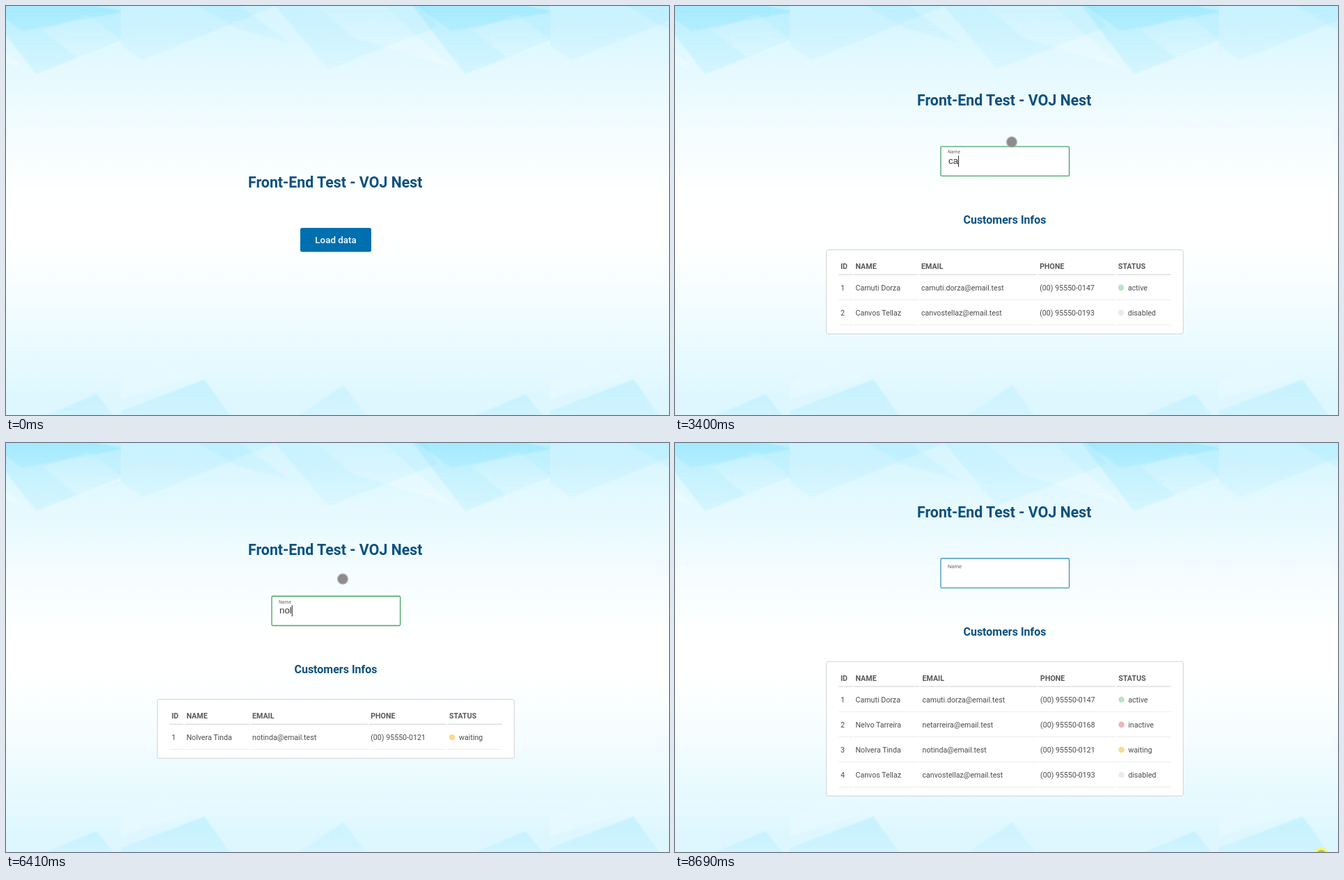
An HTML page for the animation above (8760 ms loop, 953 by 588 pixels).

```html
<!DOCTYPE html>
<html lang="en">
<head>
<meta charset="utf-8">
<title>Customers</title>
<style>
  html, body { margin: 0; width: 100%; height: 100%; overflow: hidden; background: #fff; }
  svg { display: block; width: 953px; height: 588px; font-family: Roboto, sans-serif; }
  text { white-space: pre; }
  .title { font-weight: 700; fill: #0a507f; }
  .head { font-weight: 700; font-size: 10.67px; fill: #585858; }
  .cell { font-size: 10.67px; fill: #4c4c4c; }
</style>
</head>
<body>
<svg id="stage" viewBox="0 0 953 588" xmlns="http://www.w3.org/2000/svg">
  <defs>
    <linearGradient id="sky" x1="0" y1="0" x2="0" y2="1"></linearGradient>
    <linearGradient id="cyan" x1="0" y1="0" x2="0" y2="1">
      <stop stop-color="#8fe5ff"/><stop offset="1" stop-color="#8fe5ff" stop-opacity=".5"/>
    </linearGradient>
    <linearGradient id="pale" x1="0" y1="0" x2="0" y2="1">
      <stop stop-color="#fff" stop-opacity=".4"/><stop offset="1" stop-color="#fff"/>
    </linearGradient>
    <clipPath id="tileClip"><rect x="165" width="617" height="588"/></clipPath>
    <filter id="soft" x="-10%" y="-10%" width="120%" height="120%"><feGaussianBlur stdDeviation="1.2"/></filter>
    <filter id="glow" x="-50%" y="-50%" width="200%" height="200%"><feGaussianBlur stdDeviation="0.7"/></filter>
  </defs>
  <rect width="953" height="588" fill="url(#sky)"/>
  <g id="tile" clip-path="url(#tileClip)"></g>
  <use href="#tile" x="-617"/>
  <use href="#tile" x="617"/>

  <g id="landing">
    <text class="title" x="348" y="260.5" font-size="21.33">Front-End Test - VOJ Nest</text>
    <rect x="423" y="319" width="102" height="34.6" rx="2.5" fill="#006fb0"/>
    <text x="474" y="341.3" font-size="13.33" font-weight="500" fill="#fff" text-anchor="middle">Load data</text>
  </g>

  <g id="page">
    <text class="title" x="348" y="106.5" font-size="21.33">Front-End Test - VOJ Nest</text>
    <rect id="field" x="382" y="166" width="184.7" height="42.3" rx="1.5" fill="#fff" stroke-width="1.33"/>
    <text id="label" x="392" fill="#666">Name</text>
    <text id="typed" x="393" y="191" font-size="13.333" fill="#333"
      font-family="Liberation Sans, Arial, sans-serif"></text>
    <rect id="caret" y="179" width="1" height="16" fill="#222"/>
    <text class="title" x="474" y="277" font-size="16" text-anchor="middle">Customers Infos</text>
    <rect id="panel" x="217.5" y="314.3" width="513" rx="2.5" fill="#fff" stroke="#d2d4d5"/>
    <g id="table"></g>
  </g>

  <g id="cursor">
    <circle id="halo" filter="url(#glow)"/>
    <circle id="dot" r="6.9"/>
  </g>
</svg>
<script>
const LOOP = 8760, PITCH = 36.15, KEY_STEP = 165, BLINK = 497, FOCUS = 2390;
const $ = id => document.getElementById(id);

function add(parent, tag, attrs, text) {
  const node = document.createElementNS('http://www.w3.org/2000/svg', tag);
  set(node, attrs);
  if (text !== undefined) node.textContent = text;
  parent.appendChild(node);
  return node;
}
function set(node, attrs) {
  for (const key in attrs) node.setAttribute(key, attrs[key]);
}
const clamp = (v, max = 1) => Math.min(max, Math.max(0, v));
const ramp = (t, start, length) => clamp((t - start) / length);
const ease = p => p * p * (3 - 2 * p);
const mix = (a, b, p) => a + (b - a) * p;
const mixColor = (a, b, p) => a.map((v, i) => mix(v, b[i], p));

// Background: a wash that is white in the middle, with soft facets in a repeating tile.
for (let offset = 0; offset <= 1; offset += 0.05) {
  const depth = clamp((Math.abs(offset - 0.52) - 0.04) / 0.45) ** 1.25;
  add($('sky'), 'stop', { offset, 'stop-color': `rgb(${mixColor([255, 255, 255], [216, 246, 255], depth)})` });
}
const facet = (points, fill, opacity) =>
  add($('tile'), 'polygon', { points, fill: `url(#${fill})`, opacity, filter: 'url(#soft)' });
facet('160,-5 400,-5 270,48 195,78 160,52', 'cyan', .22);
facet('268,-5 330,-5 410,54 330,32', 'cyan', .2);
facet('383,-5 600,-5 620,30 463,91', 'cyan', .22);
facet('440,-5 540,-5 640,88 500,45', 'pale', .3);
facet('581,-5 787,-5 787,48 660,98', 'cyan', .38);
facet('585,-5 725,-5 787,8 640,36', 'cyan', .55);
facet('670,35 735,12 787,52 720,75', 'pale', .25);
facet('160,545 225,507 270,533 165,565', 'pale', .2);
facet('165,582 285,537 325,592 160,592', 'cyan', .32);
facet('415,592 485,545 520,592', 'cyan', .22);
facet('665,592 747,558 775,592', 'cyan', .3);

// Customers and search
const people = [
  ['Camuti Dorza', 'camuti.dorza@email.test', '(00) 95550-0147', 'active', '#b4e7c5'],
  ['Nelvo Tarreira', 'netarreira@email.test', '(00) 95550-0168', 'inactive', '#f1b4b6'],
  ['Nolvera Tinda', 'notinda@email.test', '(00) 95550-0121', 'waiting', '#fdd88e'],
  ['Canvos Tellaz', 'canvostellaz@email.test', '(00) 95550-0193', 'disabled', '#ebebeb'],
];
const search = text => text.length < 2 ? people
  : people.filter(p => p[0].toLowerCase().includes(text));

// Each word is typed and later erased one key at a time.
const words = [{ word: 'cam', type: 3190, erase: 4620 }, { word: 'nol', type: 5590, erase: 6420 }];
const keysHit = (t, start, count) => clamp(Math.floor((t - start) / KEY_STEP) + 1, count);
const textAt = t => words.map(({ word, type, erase }) =>
  word.slice(0, keysHit(t, type, word.length) - keysHit(t, erase, word.length))).join('');

// The blink restarts on focus and on every typed key, but not on erasing.
function caretOn(t) {
  let restart = FOCUS;
  for (const { word, type } of words) {
    const hits = keysHit(t, type, word.length);
    if (hits) restart = type + (hits - 1) * KEY_STEP;
  }
  return t >= FOCUS && Math.floor((t - restart) / BLINK) % 2 === 0;
}

// The pointer travels leg by leg and presses now and then.
const entry = { x: 709, y: 516 };
const legs = [
  { start: 180, length: 530, x: 484, y: 338 },
  { start: 1330, length: 670, x: 484, y: 195.5 },
  { start: 7800, length: 400, x: 929, y: 592 },
];
const cursorAt = t => legs.reduce((at, { start, length, x, y }) => {
  const p = ease(ramp(t, start, length));
  return { x: mix(at.x, x, p), y: mix(at.y, y, p) };
}, entry);
const isPressed = t => [910, 2320, 8690].some(start => t >= start && t < start + 210);

let shown = null;
function drawTable(rows) {
  const key = rows.map(r => r[0]).join();
  if (key === shown) return;
  shown = key;
  const table = $('table');
  table.textContent = '';
  const slack = rows.length > 2 ? 0 : 1;
  const cols = [238, 259.5, 355.5 - 1.5 * slack, 525 - 0.8 * slack, 637.5 - 0.5 * slack];
  const rule = (y, stroke) => cols.forEach((x, i) => add(table, 'line',
    { x1: x - 2.6, x2: i < 4 ? cols[i + 1] - 4.4 : 713, y1: y, y2: y, stroke }));
  ['ID', 'NAME', 'EMAIL', 'PHONE', 'STATUS'].forEach((name, i) =>
    add(table, 'text', { class: 'head', x: cols[i], y: 342 }, name));
  rule(350, '#cfcfcf');
  rows.forEach(([name, email, phone, status, color], r) => {
    const y = 372.5 + r * PITCH;
    [r + 1, name, email, phone].forEach((value, i) =>
      add(table, 'text', { class: 'cell', x: cols[i], y }, value));
    add(table, 'circle', { cx: cols[4] + 4.2, cy: y - 3.8, r: 4.3, fill: color });
    add(table, 'text', { class: 'cell', x: cols[4] + 14, y }, status);
    rule(386.2 + r * PITCH, '#ebebeb');
  });
  set($('panel'), { height: 48.6 + rows.length * PITCH });
  set($('page'), { transform: `translate(0 ${(4 - rows.length) * PITCH / 2})` });
}

function drawField(t, text) {
  const focus = ease(ramp(t, FOCUS - 40, 300));
  const raised = focus * (1 - ramp(t, 8640, 250));
  const filled = words.reduce((sum, { word, type, erase }) =>
    sum + ramp(t, type - 30, 160) - ramp(t, erase + (word.length - 1) * KEY_STEP, 180), 0);
  const active = mixColor([62, 150, 194], [72, 163, 100], filled);
  set($('field'), { stroke: `rgb(${mixColor([208, 210, 212], active, focus)})` });
  set($('label'), { y: mix(193, 176.3, raised), 'font-size': mix(10.67, 6.75, raised) });
  $('typed').textContent = text;
  set($('caret'), { x: 393 + (text ? $('typed').getComputedTextLength() : 0), opacity: caretOn(t) ? 1 : 0 });
}

function drawCursor(t) {
  const { x, y } = cursorAt(t);
  const pressed = isPressed(t);
  set($('cursor'), { transform: `translate(${x} ${y})`, opacity: t >= 180 ? 1 : 0 });
  set($('halo'), pressed ? { r: 10.3, fill: '#fafa5a', opacity: .9 } : { r: 8.3, fill: '#b0b0b0', opacity: .75 });
  set($('dot'), { fill: pressed ? '#c3bf48' : '#8c8c8c' });
}

function draw(t) {
  const loaded = t >= 1060;
  set($('landing'), { display: loaded ? 'none' : 'inline' });
  set($('page'), { display: loaded ? 'inline' : 'none' });
  const text = textAt(t);
  drawTable(search(text));
  drawField(t, text);
  drawCursor(t);
}

const start = performance.now();
function tick() {
  draw((performance.now() - start) % LOOP);
  requestAnimationFrame(tick);
}
tick();
</script>
</body>
</html>
```
